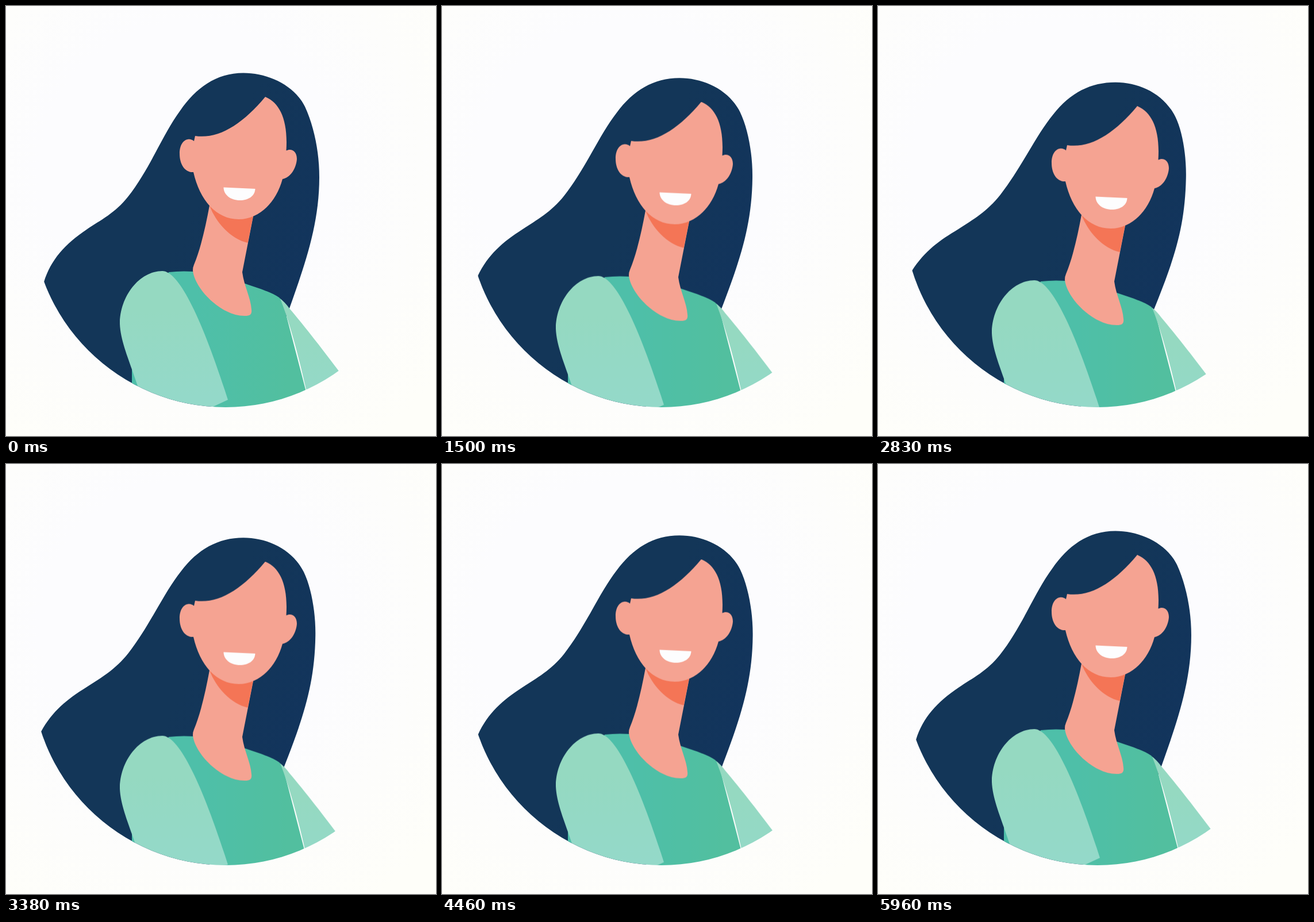
Animation, 748 px wide and 748 px high, one loop 6000 ms. Source, as an HTML page without scripts:

```html
<!DOCTYPE html>
<html lang="en">
<head>
<meta charset="utf-8">
<title>Portrait</title>
<style>
  html, body {
    margin: 0;
    width: 100%;
    height: 100%;
    overflow: hidden;
    background: radial-gradient(circle at 42% 38%, #fcfcfe 40%, #fefef9 90%);
  }
  svg { display: block; width: 100vw; height: 100vh; }

  .bob, .hair {
    animation: 1s cubic-bezier(.333, 0, .667, 1) infinite alternate;
  }
  .bob { animation-name: bob; }
  .hair {
    animation-name: sway;
    fill: url(#navy);
    d: path("M58 504 L66 480 C78 441 103 414 140 389 C165 372 190 360 212 332 C250 284 272 224 303 182 C330 143 365 116.5 413 116.5 C455 116.5 501 137 520 175 C536 210 545 254 545 298 C545 380 520 450 493 526 L481 560 L300 760 L0 760 Z");
  }
  @keyframes bob {
    from { transform: translateY(0); }
    to { transform: translateY(17.4px); }
  }
  @keyframes sway {
    from { d: path("M58 504 L66 480 C78 441 103 414 140 389 C165 372 190 360 212 332 C250 284 272 224 303 182 C330 143 365 116.5 413 116.5 C455 116.5 501 137 520 175 C536 210 545 254 545 298 C545 380 520 450 493 526 L481 560 L300 760 L0 760 Z"); }
    to { d: path("M40 484 L58.5 459 C82 424 108 407 140 388 C165 372 190 357 213 328 C250 280 275 225 305 189 C335 151 371 134 413 134 C455 134 497 154 517 194 C530 220 536 265 535 300 C533 385 516 437 479 528 L466 560 L300 760 L0 760 Z"); }
  }

  .skin { fill: #f5a392; }
  .shade { fill: #f47556; }
  .shirt { fill: url(#green); }
  .sleeve { fill: url(#mint); }
  .teeth { fill: #fdfdfe; }
</style>
</head>
<body>
<svg viewBox="0 0 748 748">
  <defs>
    <clipPath id="disc"><circle cx="382" cy="360.3" r="337.7"/></clipPath>
    <linearGradient id="navy" x1="0" y1="0" x2="1" y2=".6">
      <stop offset=".6" stop-color="#133658"/>
      <stop offset="1" stop-color="#12345d"/>
    </linearGradient>
    <linearGradient id="green" x1="0" x2="1">
      <stop offset=".35" stop-color="#4ebfa9"/>
      <stop offset=".85" stop-color="#52bf9f"/>
    </linearGradient>
    <linearGradient id="mint" x1="0" y1="0" x2="0" y2="1">
      <stop offset=".25" stop-color="#95d9c1"/>
      <stop offset=".8" stop-color="#94d9c9"/>
    </linearGradient>
  </defs>

  <g clip-path="url(#disc)">
    <path class="hair"/>
    <g class="bob">
      <!-- torso and arms -->
      <path class="shirt" d="M219 600 L283 463 Q304 460.5 326 462 L416 483 C437 490 462 498 475 507 L481 513 L540 740 L219 740 Z"/>
      <path class="sleeve" d="M477 509 Q485 515 493 526 C520 558 550 596 594 655 L594 740 L538 740 C517 640 499 565 477 509 Z"/>
      <path class="sleeve" d="M198 553 C198 505 232 461 272 461 C300 461 340 540 386 685 L276 736 L255 736 L219 632 C212 611 199 580 198 553 Z"/>

      <!-- neck -->
      <path class="skin" d="M354 347 C347 385 338 424 327 450 Q325 454 325 460 C328 492 375 540 416 539 C425 539 428 536 427 528 C426 508 414 487 411 463 L430 366 L405 340 Z"/>
      <path class="shade" d="M354 347 C365 377 392 406 420.500 412 L430 365 L405 340 Z"/>

      <!-- face -->
      <path class="skin" d="M451 158 C476 168 491 198 487.500 251.500 C496 247 506 252 506 266 C505 283 494 299 481 301 C470 342 440 371 405 371 C366 371 337 338 326 289 C311 290 302 275 302 257 C302 238 312 230 321 232 Q325 233 327 235 L329 226 C370 232 411 206 451 158 Z"/>
      <path class="teeth" d="M378.500 315.500 L433.500 318 C433 331 421 338 407 338 C390 338 378.500 328 378.500 315.500 Z"/>
    </g>
  </g>
</svg>
</body>
</html>
```
